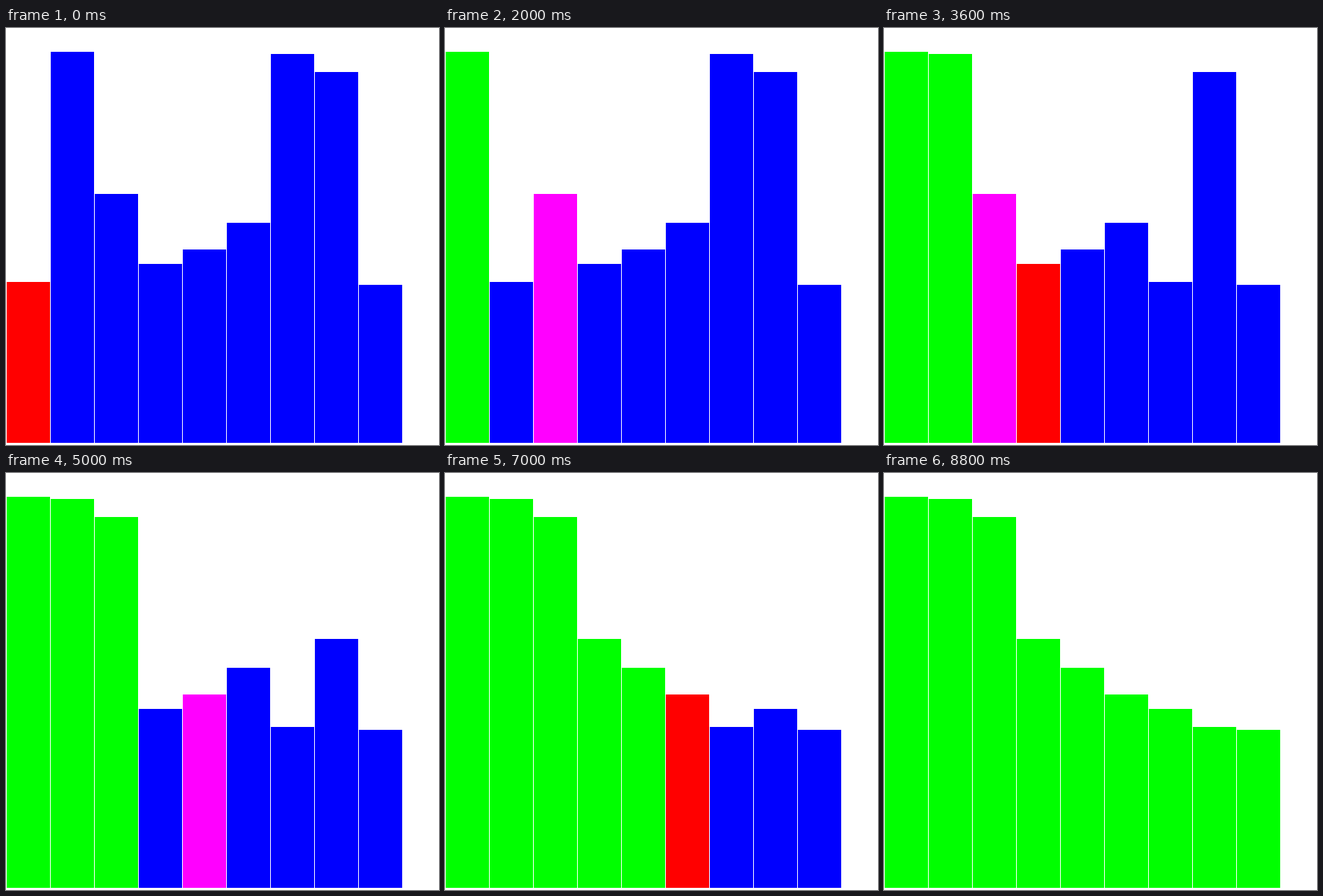
An HTML page with a canvas that plays this animation: 600x578 px, repeating every 9000 ms.

```html
<!DOCTYPE html>
<html lang="en">
<head>
<meta charset="utf-8">
<title>Selection sort</title>
<style>
  html, body { margin: 0; width: 100%; height: 100%; overflow: hidden; background: #fff; }
  canvas { display: block; }
</style>
</head>
<body>
<canvas id="stage" width="600" height="578"></canvas>
<script>
const ctx = document.getElementById('stage').getContext('2d');
const STEP = 200, BASE = 575, PITCH = 61, BAR = 60;
const BLUE = '#00f', RED = '#f00', PINK = '#f0f', GREEN = '#0f0';

// Descending selection sort, recorded one comparison at a time.
function record(heights) {
  const bars = [...heights], steps = [], last = bars.length - 1;
  for (let i = 0; i < last; i++) {
    let best = i;
    for (let j = i; j <= last; j++) {
      if (bars[j] > bars[best]) best = j;
      steps.push({ bars: [...bars], sorted: i, best, cursor: j });
    }
    [bars[i], bars[best]] = [bars[best], bars[i]];
  }
  steps.push({ bars, sorted: bars.length });
  return steps;
}

function colour(k, { sorted, best, cursor }) {
  if (k < sorted) return GREEN;
  if (k === best && (k !== cursor || k !== sorted)) return PINK;
  return k === cursor ? RED : BLUE;
}

function draw(step) {
  ctx.fillStyle = '#fff';
  ctx.fillRect(0, 0, 600, 578);
  step.bars.forEach((h, k) => {
    ctx.fillStyle = colour(k, step);
    ctx.fillRect(1 + k * PITCH, BASE - h, BAR, h);
  });
}

const steps = record([223, 542, 345, 248, 268, 305, 539, 514, 219]);
const start = performance.now();

function tick() {
  const t = Math.max(0, performance.now() - start);
  draw(steps[Math.floor(t / STEP) % steps.length]);
  requestAnimationFrame(tick);
}
tick();
</script>
</body>
</html>
```
